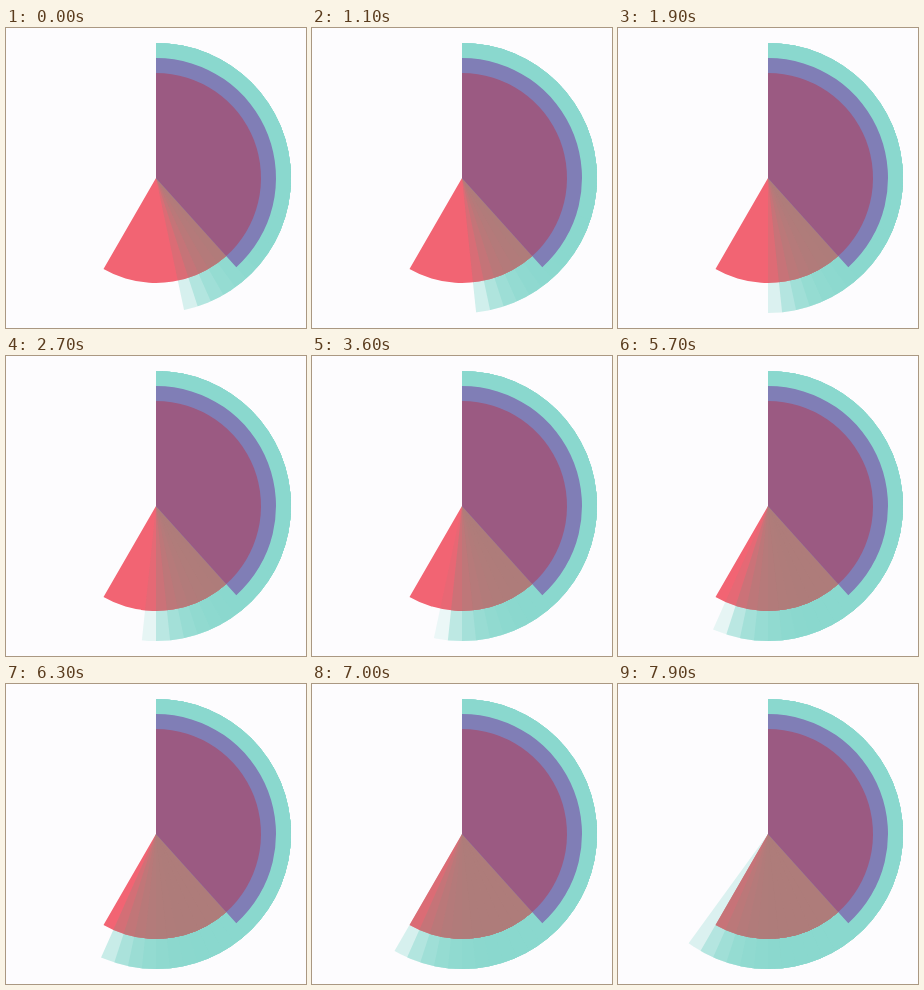
Recreate the animation shown at these times as an HTML page. Size 300 px wide and 300 px high, loop 8 s.

```html
<!DOCTYPE html>
<html lang="en">
<head>
<meta charset="utf-8">
<title>Polar clock</title>
<style>
  html, body { margin: 0; width: 100%; height: 100%; overflow: hidden; background: #fdfcfe; }
  svg { display: block; width: 100vw; height: 100vh; }
</style>
</head>
<body>
<svg viewBox="0 0 300 300">
  <defs>
    <clipPath id="dial"><circle cx="150" cy="150" r="135"/></clipPath>
    <clipPath id="hourClip"><path class="hour"/></clipPath>
  </defs>
  <g id="seconds" fill="#89d8cd" clip-path="url(#dial)"></g>
  <path class="hour" fill="#f26473"/>
  <g id="overlap" fill="#ae7c7a" clip-path="url(#hourClip)"></g>
  <path id="minute" fill="#807eb6"/>
  <path id="minuteHour" fill="#9b5a82"/>
</svg>
<script>
const LOOP = 8000, STEP = 100, TICK = 1000;
const START_SECOND = 28, START_AGE = 400;
const LAYERS = 12, FADE = 1550, HEAD_START = 250;
const byId = id => document.getElementById(id);

function sector(radius, degrees) {
  const a = degrees * Math.PI / 180;
  const x = 150 + radius * Math.sin(a), y = 150 - radius * Math.cos(a);
  return `M150 150V${150 - radius}A${radius} ${radius} 0 ${degrees > 180 ? 1 : 0} 1 ${x} ${y}Z`;
}

function addLayers(group) {
  return Array.from({ length: LAYERS }, () =>
    group.appendChild(document.createElementNS("http://www.w3.org/2000/svg", "path")));
}

document.querySelectorAll(".hour").forEach(p => p.setAttribute("d", sector(105, 210)));
byId("minute").setAttribute("d", sector(120, 138));
byId("minuteHour").setAttribute("d", sector(105, 138));
const stacks = [addLayers(byId("seconds")), addLayers(byId("overlap"))];

// Each past second is a translucent sector; overlapping ones build up to solid colour.
function draw(time) {
  const t = Math.floor(time % LOOP / STEP) * STEP + START_AGE;
  const second = START_SECOND + Math.floor(t / TICK);
  const newest = 1 - Math.exp(-(t % TICK + HEAD_START) / FADE);
  const settled = 1 - Math.exp(-TICK / FADE);
  for (const stack of stacks) {
    stack.forEach((path, i) => {
      path.setAttribute("d", sector(140, (second - i) * 6));
      path.setAttribute("fill-opacity", i ? settled : newest);
    });
  }
}

const start = performance.now();
function frame() {
  draw(performance.now() - start);
  requestAnimationFrame(frame);
}
frame();
</script>
</body>
</html>
```
